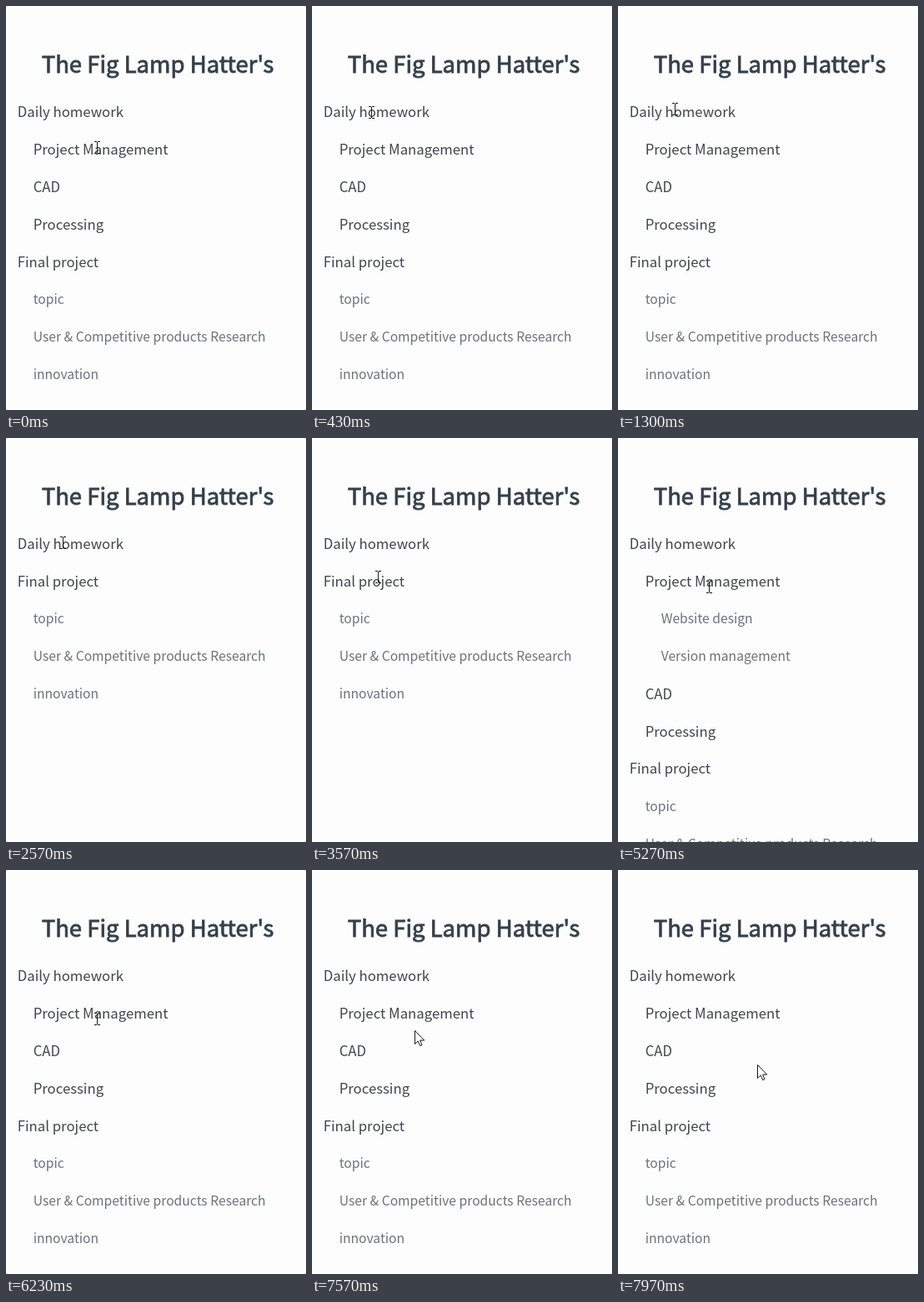
An HTML page for the animation above (8 s loop, 360 px wide and 484 px high).

```html
<!DOCTYPE html>
<html lang="en">
<head>
<meta charset="utf-8">
<title>Course outline</title>
<style>
  html, body { margin: 0; width: 100%; height: 100%; overflow: hidden; background: #fdfdfd; }
  svg { display: block; width: 360px; height: 484px; cursor: default; }
  text { font-family: "Noto Sans CJK SC", "Noto Sans CJK JP", "Noto Sans CJK", "Noto Sans", sans-serif; }
  .title { font-size: 27.5px; fill: #34404c; stroke: #34404c; stroke-width: .8px; text-anchor: middle; }
  .main { font-size: 16.75px; fill: #40444f; }
  .sub { font-size: 15.67px; fill: #6c7080; }
</style>
</head>
<body>
<svg viewBox="0 0 360 484">
  <text class="title" x="182" y="80">The Fig Lamp Hatter's</text>
  <g id="list"></g>
  <path id="beam" d="M.5 -7V6M-3 -7.5H0M1 -7.5H4M-3 6.5H0M1 6.5H4"
        stroke="#181818" shape-rendering="crispEdges"/>
  <path id="arrow" d="M.5 .5V16.5L4.2 13 6.7 18.6 9 17.6 6.6 12.1H11.8Z"
        fill="#fff" stroke="#181818"/>
</svg>
<script>
const LOOP = 8000, PITCH = 44.9, FIRST = 133, INDENT = 19;

// Leading dots give the depth, a trailing * marks lighter entries
const outline = `
Daily homework
.Project Management
..Website design*
..Version management*
.CAD
.Processing
Final project
.topic*
.User & Competitive products Research*
.innovation*`.trim().split("\n");

const between = (t, a, b) => t >= a && t < b;
const closed = {
  "Daily homework": t => between(t, 1330, 4200),
  "Project Management": t => !between(t, 5230, 6200)
};

// The pointer rests between these moves
const home = { x: 109, y: 170 };
const moves = [
  { from: 30, to: 730, x: 68, y: 124 },
  { from: 1300, to: 1400, x: 68, y: 126 },
  { from: 2570, to: 2900, x: 79, y: 167 },
  { from: 3570, to: 3970, x: 114, y: 123 },
  { from: 4470, to: 4770, x: 109, y: 179 },
  { from: 7530, to: 7970, x: 167, y: 233 }
];

const byId = id => document.getElementById(id);
const list = byId("list"), beam = byId("beam"), arrow = byId("arrow");

const rows = outline.map(line => {
  const [, dots, label, light] = line.match(/^(\.*)(.*?)(\*?)$/);
  const el = document.createElementNS("http://www.w3.org/2000/svg", "text");
  const x = 13.7 + dots.length * INDENT;
  el.textContent = label;
  el.setAttribute("class", light ? "sub" : "main");
  el.setAttribute("x", x);
  list.append(el);
  return { el, x, label, depth: dots.length, lift: light ? 0.5 : 0, width: el.getComputedTextLength() };
});

function layout(t) {
  let line = 0, hideBelow = Infinity;
  for (const row of rows) {
    row.shown = row.depth <= hideBelow;
    row.el.style.display = row.shown ? "" : "none";
    if (!row.shown) continue;
    hideBelow = closed[row.label]?.(t) ? row.depth : Infinity;
    row.y = FIRST + PITCH * line++ - row.lift;
    row.el.setAttribute("y", row.y);
  }
}

const easeOut = k => 1 - (1 - k) ** 3;

function pointer(t) {
  let { x, y } = home;
  for (const m of moves) {
    const k = easeOut(Math.min(1, Math.max(0, (t - m.from) / (m.to - m.from))));
    x += (m.x - x) * k;
    y += (m.y - y) * k;
  }
  return [Math.round(x), Math.round(y)];
}

// The pointer is a text beam only while it is over a label
const isOver = (row, x, y) => row.shown && Math.abs(y - row.y + 6) <= 13 &&
  between(x, row.x, row.x + row.width);

function draw(t) {
  layout(t);
  const [x, y] = pointer(t);
  const onText = rows.some(row => isOver(row, x, y));
  beam.style.display = onText ? "" : "none";
  arrow.style.display = onText ? "none" : "";
  (onText ? beam : arrow).setAttribute("transform", `translate(${x} ${y})`);
}

let start;
function tick(now) {
  start ??= now;
  draw((now - start) % LOOP);
  requestAnimationFrame(tick);
}
draw(0);
requestAnimationFrame(tick);
</script>
</body>
</html>
```
